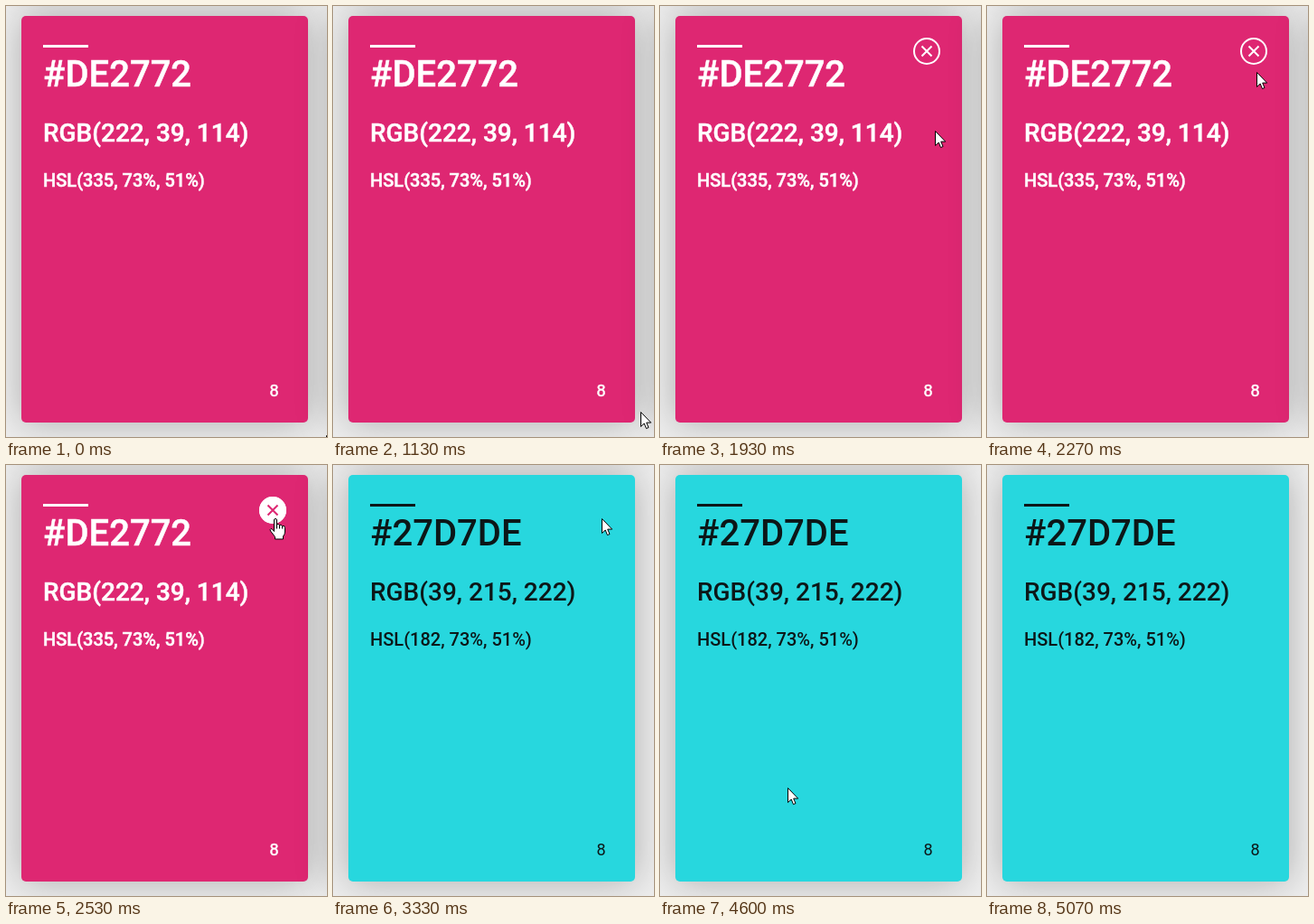
Animation of 355x477 px, one loop 5940 ms. Source, as an HTML page:

```html
<!DOCTYPE html>
<html lang="en">
<head>
<meta charset="utf-8">
<title>Colour card</title>
<style>
html, body { margin: 0; width: 100%; height: 100%; overflow: hidden; background: #eee; }
#stage { position: absolute; inset: 0; overflow: hidden; contain: strict; }
.card {
  position: absolute; left: 17px; top: 11px; width: 317px; height: 450px;
  border-radius: 5px; background: var(--paint); box-shadow: 0 0 42px rgba(0, 0, 0, .28);
}
.above { top: -475px; }
.next { left: 362px; }
svg { position: absolute; left: 0; top: 0; overflow: hidden; }
text { font: 500 40px Roboto, sans-serif; fill: var(--ink); stroke: var(--ink); stroke-width: var(--weight); }
#rgb { font-size: 28px; }
#hsl { font-size: 20px; }
#index { font-size: 18px; font-weight: 400; }
.pointer { fill: #fff; stroke: #000; stroke-linejoin: round; }
</style>
</head>
<body>
<div id="stage">
  <div class="card above"></div>
  <div class="card"></div>
  <div class="card next" id="next"></div>
  <svg width="355" height="477" viewBox="0 0 355 477">
    <rect x="41" y="43" width="50" height="3" fill="var(--ink)"/>
    <text id="hex" x="41" y="89"></text>
    <text id="rgb" x="41" y="150"></text>
    <text id="hsl" x="41" y="200"></text>
    <text id="index" x="291.5" y="432">8</text>
    <g id="close" fill="none" stroke="#fff" stroke-width="2">
      <circle cx="295" cy="50" r="14"/>
      <path d="M289.5 44.5l11 11m0-11l-11 11"/>
      <g id="hover">
        <circle cx="295" cy="50" r="14" fill="#fff"/>
        <path d="M289.5 44.5l11 11m0-11l-11 11" stroke="#de2772"/>
      </g>
    </g>
    <path id="arrow" class="pointer" d="M.5 .5V16.5L4.2 13L6.5 18.6L9 17.5L6.7 12.1H11.7Z"/>
    <g id="hand" class="pointer">
      <path d="M-.5 14.5V2Q-.5 .5 1 .5T2.5 2V7Q4 5.5 5.5 7.5Q7 6.5 8.5 8.5Q11.5 7.5 11.5 10.5V15Q11.5 17.5 9.5 20V23H.5V20.5L-4.5 14Q-5.5 12 -4 11.5Q-2.5 11.5 -.5 14.5Z"/>
      <path fill="none" d="M2.5 7V11.5M5.5 7.5V11.5M8.5 8.5V11.5"/>
    </g>
  </svg>
</div>
<script>
const LOOP = 5940, TICK = 200 / 3, SWAP = 3330;
const $ = id => document.getElementById(id);

const colours = [
  { hex: '#DE2772', rgb: 'RGB(222, 39, 114)', hsl: 'HSL(335, 73%, 51%)', ink: '#fff', weight: '.5px' },
  { hex: '#27D7DE', rgb: 'RGB(39, 215, 222)', hsl: 'HSL(182, 73%, 51%)', ink: '#0c1718', weight: '0' }
];

// Pointer paths as [tick, x, y]
const enter = [[16, 354, 475], [17, 340, 449], [25, 304, 217], [29, 304, 138], [34, 298, 73], [36, 297, 59]];
const leave = [[59, 297, 59], [63, 253, 178], [68, 158, 335], [75, 42, 464]];

const clamp = (v, lo = 0, hi = 1) => Math.min(hi, Math.max(lo, v));

// Smooth curve through the path's points
function along(path, tick) {
  const last = path.length - 1;
  const t = clamp(tick, path[0][0], path[last][0]);
  const i = path.findIndex(p => p[0] >= t && p !== path[0]) - 1;
  const a = path[i], b = path[i + 1], span = b[0] - a[0], u = (t - a[0]) / span;
  const slope = (n, axis) => {
    const p = path[Math.max(0, n - 1)], q = path[Math.min(last, n + 1)];
    return (q[axis] - p[axis]) / (q[0] - p[0]);
  };
  return [1, 2].map(axis => {
    const w = u * u * (3 - 2 * u);
    return Math.round(a[axis] * (1 - w) + b[axis] * w
      + span * (u * (1 - u) ** 2 * slope(i, axis) - u * u * (1 - u) * slope(i + 1, axis)));
  });
}

const show = (el, on) => { el.style.display = on ? '' : 'none'; };

function draw(time) {
  const tick = Math.floor((time + 3.4) / TICK);
  const swapped = time >= SWAP;
  const colour = colours[+swapped];
  const root = document.documentElement.style;
  root.setProperty('--paint', colour.hex);
  root.setProperty('--ink', colour.ink);
  root.setProperty('--weight', colour.weight);
  for (const key of ['hex', 'rgb', 'hsl']) $(key).textContent = colour[key];
  show($('next'), !swapped);

  show($('close'), !swapped);
  $('close').style.opacity = clamp((tick - 17) / 3);
  $('hover').style.opacity = clamp((tick - 34) / 4);

  const [x, y] = along(tick < 50 ? enter : leave, tick);
  const pointing = tick >= 35 && !swapped;
  show($('arrow'), !pointing && tick < 76);
  show($('hand'), pointing);
  for (const id of ['arrow', 'hand']) $(id).setAttribute('transform', `translate(${x} ${y})`);
}

const start = performance.now();
function frame() {
  draw((performance.now() - start) % LOOP);
  requestAnimationFrame(frame);
}
frame();
</script>
</body>
</html>
```
